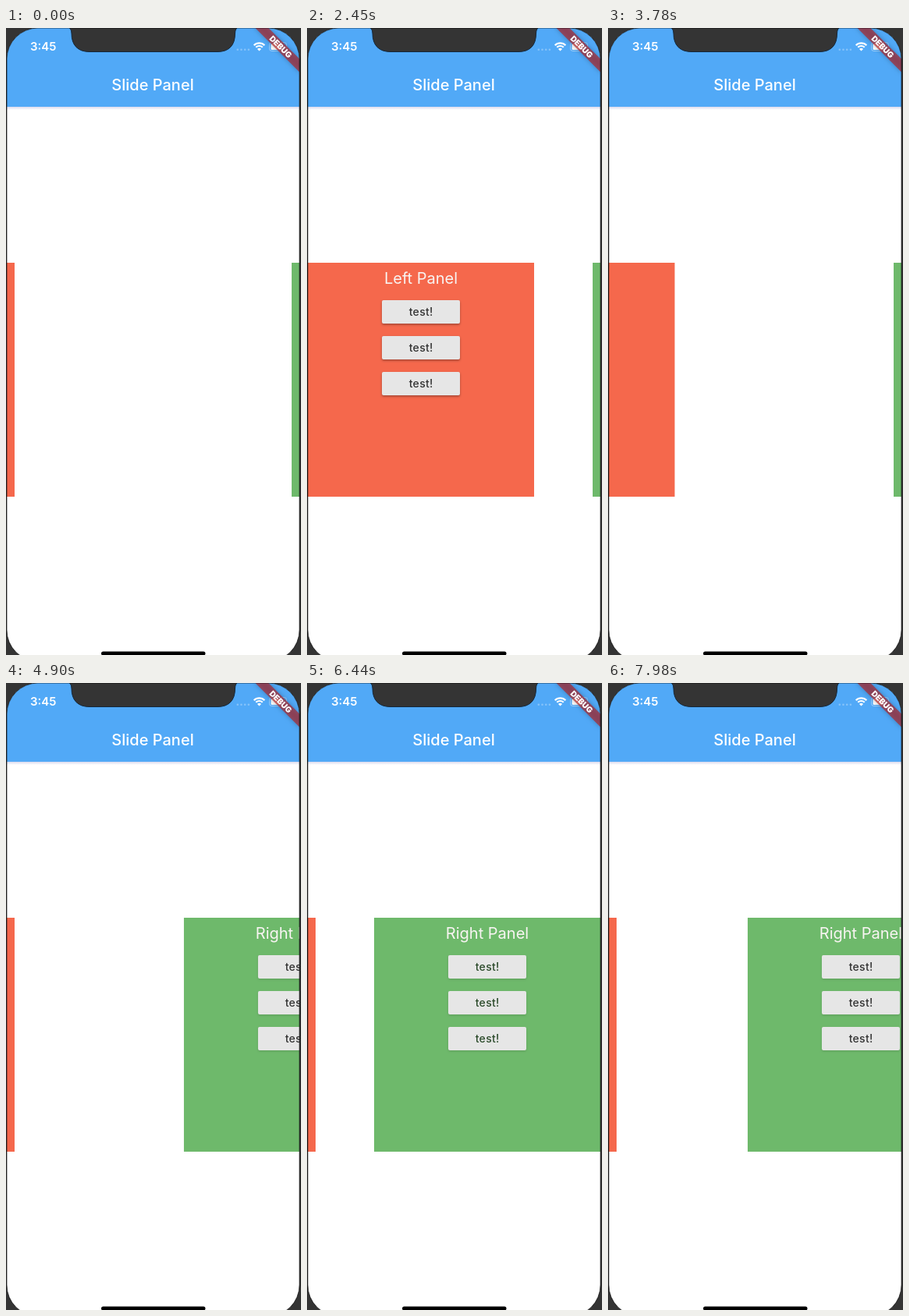
Animation of 378 by 804 pixels, one loop 8 s. Source, as an HTML page with a canvas:

```html
<!DOCTYPE html>
<html lang="en">
<head>
<meta charset="utf-8">
<title>Slide Panel</title>
<style>
  html, body { margin: 0; width: 100%; height: 100%; overflow: hidden; background: #343434; }
  canvas { display: block; width: 378px; height: 804px; }
</style>
</head>
<body>
<canvas id="stage"></canvas>
<script>
const W = 378, H = 804, LOOP = 8000, STEP = 70;
const FONT = 'Inter, Roboto, sans-serif';
const SCREEN = { x: 1, y: 0, w: 375, h: 812, r: 40 };
const PANEL = { w: 290, h: 300, y: 301, peek: 10 };
const TRAVEL = PANEL.w - PANEL.peek;

const canvas = document.getElementById('stage');
const ctx = canvas.getContext('2d');
const dpr = window.devicePixelRatio || 1;
canvas.width = W * dpr;
canvas.height = H * dpr;

// [time, openness] pairs
const leftKeys = [[2030, 0], [2100, .07], [2170, .24], [2240, .5], [2310, .76], [2380, .94], [2450, 1],
                  [3640, 1], [3710, .668], [3780, .266], [3850, .05], [3920, 0]];
const rightKeys = [[4690, 0], [4760, .07], [4830, .24], [4900, .493], [4970, .76], [5040, .94], [5110, 1],
                   [7910, 1], [7980, .668]];

function sample(keys, t) {
  if (t <= keys[0][0]) return keys[0][1];
  for (let i = 1; i < keys.length; i++) {
    const [t0, a] = keys[i - 1], [t1, b] = keys[i];
    if (t <= t1) return a + (b - a) * (t - t0) / (t1 - t0);
  }
  return keys[keys.length - 1][1];
}

function box(x, y, w, h, r, color) {
  ctx.fillStyle = color;
  ctx.beginPath();
  ctx.roundRect(x, y, w, h, r);
  ctx.fill();
}

function label(str, x, y, size, weight, color, spacing = 0) {
  ctx.font = `${weight} ${size}px ${FONT}`;
  ctx.letterSpacing = spacing + 'px';
  ctx.textAlign = 'center';
  ctx.fillStyle = color;
  ctx.fillText(str, x + spacing / 2, y);
  ctx.letterSpacing = '0px';
}

function shadow(color, blur, dy) {
  ctx.shadowColor = color;
  ctx.shadowBlur = blur * dpr;
  ctx.shadowOffsetY = dy * dpr;
}

function panel(x, title, color, ink, shade) {
  box(x, PANEL.y, PANEL.w, PANEL.h, 0, color);
  const cx = x + PANEL.w / 2;
  label(title, cx, 328, 20, 400, '#f8f4f2');
  for (let i = 0; i < 3; i++) {
    const y = 349 + i * 46;
    ctx.save();
    shadow(`rgba(0,0,0,${shade})`, 3, 1.5);
    box(cx - 50, y, 100, 30, 2, '#e6e6e6');
    ctx.restore();
    label('test!', cx, y + 20, 14, 500, ink, .3);
  }
}

function appBar() {
  box(0, 0, W, 101, 0, '#51a9f7');
  const fade = ctx.createLinearGradient(0, 101, 0, 105);
  fade.addColorStop(0, '#d9d9ee');
  fade.addColorStop(1, '#ffffff');
  box(0, 101, W, 4, 0, fade);
  label('Slide Panel', 188, 80, 20, 500, '#fff');
}

function statusBar() {
  label('3:45', 47.7, 29, 15, 600, '#fff');
  for (let i = 0; i < 4; i++) box(295.5 + i * 4.7, 26.5, 2.6, 2.6, 1.3, 'rgba(255,255,255,.3)');
  // wifi
  ctx.strokeStyle = '#fff';
  ctx.lineWidth = 2.2;
  for (const r of [6, 9.6]) {
    ctx.beginPath();
    ctx.arc(324.5, 29, r, -Math.PI * .75, -Math.PI * .25);
    ctx.stroke();
  }
  ctx.fillStyle = '#fff';
  ctx.beginPath();
  ctx.moveTo(324.5, 29.5);
  ctx.arc(324.5, 29.5, 3.6, -Math.PI * .75, -Math.PI * .25);
  ctx.fill();
  // battery
  ctx.strokeStyle = 'rgba(255,255,255,.4)';
  ctx.lineWidth = 1;
  ctx.beginPath();
  ctx.roundRect(337.5, 18.5, 22, 11, 3);
  ctx.stroke();
  box(339.5, 20, 13, 8, 1.5, '#fff');
}

function banner() {
  ctx.save();
  ctx.translate(376, 0);
  ctx.rotate(Math.PI / 4);
  ctx.save();
  shadow('rgba(0,0,0,.4)', 6, 0);
  box(-40, 28, 80, 12, 0, 'rgba(183,28,28,.63)');
  ctx.restore();
  label('DEBUG', 0, 37.7, 10.2, 900, '#fff');
  ctx.restore();
}

function notch() {
  ctx.beginPath();
  ctx.moveTo(78, -2);
  ctx.quadraticCurveTo(84, 0, 84, 7);
  ctx.bezierCurveTo(84, 22, 92, 30.5, 107, 30.5);
  ctx.lineTo(271, 30.5);
  ctx.bezierCurveTo(286, 30.5, 293.5, 22, 293.5, 7);
  ctx.quadraticCurveTo(293.5, 0, 299, -2);
  ctx.closePath();
  ctx.fillStyle = '#343434';
  ctx.fill();
  ctx.strokeStyle = '#14283c';
  ctx.lineWidth = 1;
  ctx.stroke();
}

function screenPath() {
  ctx.beginPath();
  ctx.roundRect(SCREEN.x, SCREEN.y, SCREEN.w, SCREEN.h, SCREEN.r);
}

function draw(t) {
  t = Math.floor(t / STEP) * STEP;
  ctx.setTransform(dpr, 0, 0, dpr, 0, 0);
  box(0, 0, W, H, 0, '#343434');

  ctx.save();
  screenPath();
  ctx.clip();
  box(0, 0, W, H, 0, '#fff');
  appBar();
  const left = sample(leftKeys, t), right = sample(rightKeys, t);
  const rightInk = t >= 5320 && t < 7980 ? '#2b4a2a' : '#333';
  panel(1 - TRAVEL * (1 - left), 'Left Panel', '#f5684c', '#333', .35);
  panel(366 - TRAVEL * right, 'Right Panel', '#6eb96b', rightInk, .12);
  statusBar();
  banner();
  notch();
  box(122, 799.5, 133.5, 5, 2.5, '#000');
  ctx.restore();

  screenPath();
  ctx.strokeStyle = 'rgba(0,0,0,.65)';
  ctx.lineWidth = 1;
  ctx.stroke();
}

const start = performance.now();
function tick() {
  draw((performance.now() - start) % LOOP);
  requestAnimationFrame(tick);
}
tick();
</script>
</body>
</html>
```
